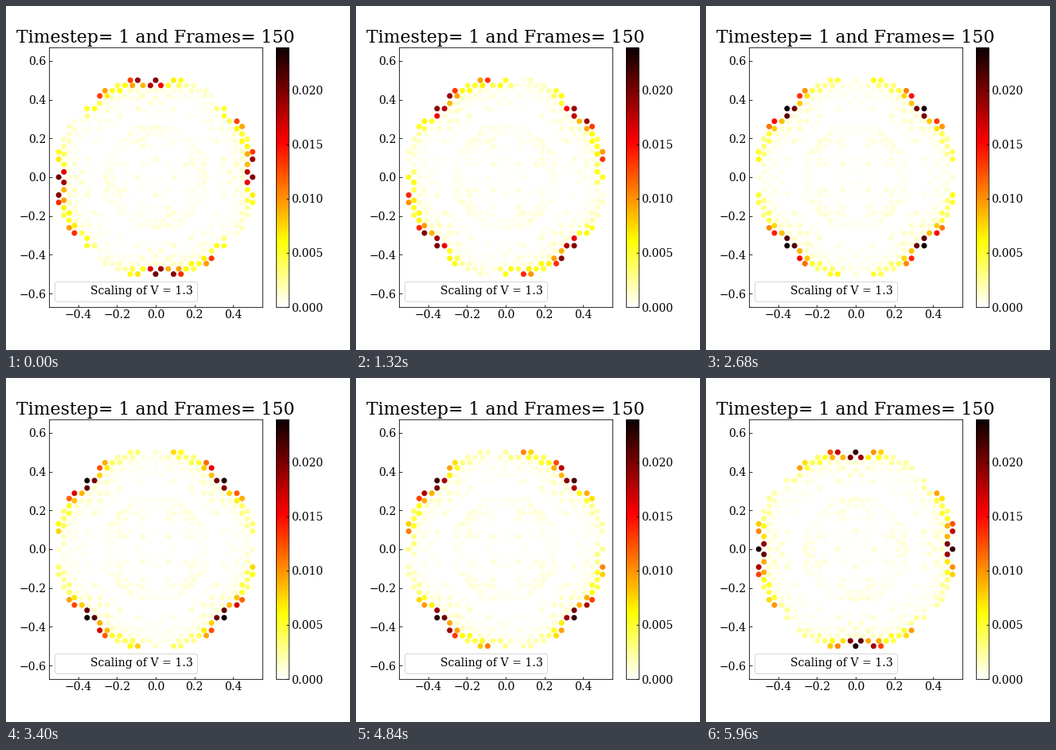
A matplotlib script for the animation above (6000 ms loop, 432 by 432 pixels).

```python
import numpy as np
import matplotlib.pyplot as plt
from matplotlib.animation import FuncAnimation

FRAMES, INTERVAL = 150, 40
VMAX = 0.02394
EDGE = 6 + 5 * np.sqrt(2)            # apothem of the octagonal patch, in tile edges
PHASE0, STEP = np.radians(50), np.radians(-19.48)

plt.rcParams.update({
    "font.family": "DejaVu Serif", "font.size": 14,
    "xtick.direction": "in", "ytick.direction": "in",
    "xtick.labelsize": 14, "ytick.labelsize": 14,
})


def in_octagon(x, y, apothem):
    x, y = abs(x), abs(y)
    return (np.maximum(x, y) <= apothem) & (x + y <= apothem * np.sqrt(2))


def tiling():
    """Vertices of the eightfold quasicrystal by cut and project."""
    n, m = np.arange(-8, 9), np.arange(-11, 12)
    a, b, c, d = (g.ravel() for g in np.meshgrid(n, m, n, m, indexing="ij"))
    x, y = a + b / np.sqrt(2), c + d / np.sqrt(2)
    keep = (b + d) % 2 == 0
    keep &= in_octagon(a - b / np.sqrt(2), c - d / np.sqrt(2), (1 + np.sqrt(2)) / 2)
    keep &= in_octagon(x, y, EDGE + 1e-6)
    return x[keep], y[keep]


# rim shells: radius, mean density, modulation depth, phase skew
SHELLS = [
    (13.071, 0.0125, 0.93, 0.00),
    (12.384, 0.0107, 0.95, -0.08),
    (12.481, 0.0047, 0.90, 0.00),
    (12.751, 0.0053, 0.78, 0.00),
    (13.033, 0.0038, 0.70, 0.00),
    (13.292, 0.0100, 0.93, 0.33),
    (13.383, 0.0030, 0.60, 0.00),
    (13.510, 0.0075, 0.80, 0.02),
    (12.617, 0.0038, 0.75, 0.00),
]

x, y = tiling()
r, theta = np.hypot(x, y), np.arctan2(y, x)

# faint bulk, equal on each symmetry orbit
speckle = np.sin(37 * np.round(r, 3)) ** 4
mean = 0.0016 * np.exp((r - 12.4) / 0.7) + 0.0008 * speckle
depth = np.full(r.size, 0.5)
angle = 4 * theta
for radius, level, mod, skew in SHELLS:
    on = abs(r - radius) < 0.012
    mean[on], depth[on] = level, mod
    angle[on] += skew * np.sign(np.sin(8 * theta[on]))
mean *= 1 + 0.03 * np.cos(theta - 4.1)


def density(i):
    return mean * (1 + depth * np.cos(angle - PHASE0 - STEP * i))


fig = plt.figure(figsize=(6, 6), dpi=72, facecolor="white")
ax = fig.add_axes([0.125, 0.125, 0.62, 0.755])
cax = fig.add_axes([338.58 / 432, 0.125, 16.31 / 432, 0.755])

dots = ax.scatter(x * 0.5 / EDGE, y * 0.5 / EDGE, c=density(0), s=36,
                  cmap="hot_r", vmin=0, vmax=VMAX)
ax.plot([], [], ls="none", label="Scaling of V = 1.3")
half = 0.55 * (0.755 / 0.62)
ax.set(xlim=(-0.55, 0.55), ylim=(-half, half),
       xticks=np.arange(-2, 3) * 0.2, yticks=np.arange(-3, 4) * 0.2)
ax.set_title("Timestep= 1 and Frames= 150", fontsize=22)
ax.legend(loc="lower left", fontsize=14)
fig.colorbar(dots, cax=cax, ticks=np.arange(5) * 0.005, format="%.3f")


def update(i):
    dots.set_array(density(i))
    return dots,


anim = FuncAnimation(fig, update, frames=FRAMES, interval=INTERVAL,
                     repeat=True, repeat_delay=0, blit=False)
plt.show()
```
